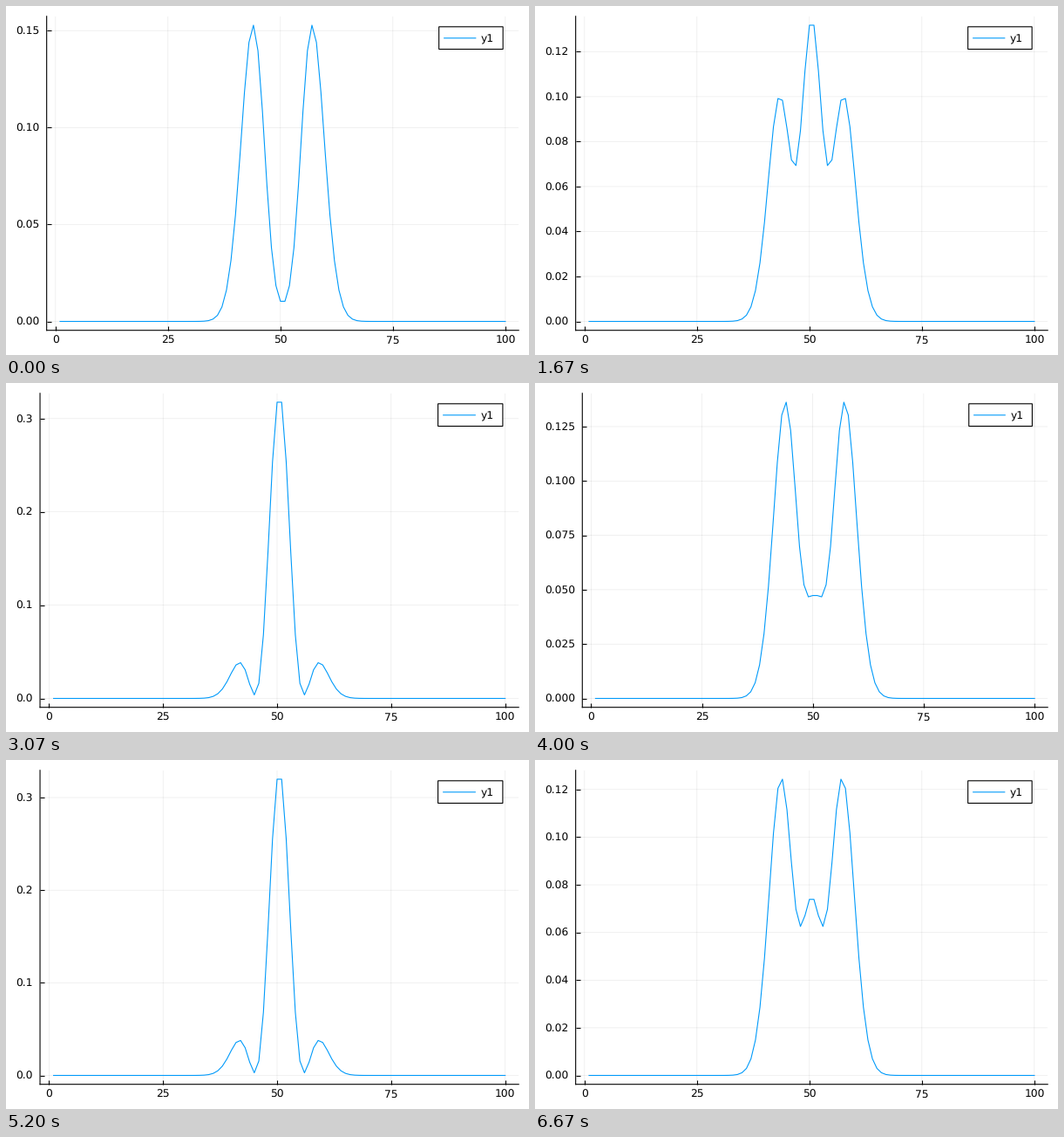
Animation of 600x400 px, one loop 6740 ms. Source, as a matplotlib script:

```python
import math

import numpy as np
import matplotlib.pyplot as plt
from matplotlib.animation import FuncAnimation
from matplotlib.lines import Line2D
from matplotlib.patches import Rectangle
from matplotlib.transforms import Affine2D

W, H, DPI = 600, 400, 100
FRAMES, INTERVAL = 101, 66.66  # 15 frames per second
TOP, RIGHT, BOTTOM = 11.8, 588.2, 371.7
BLUE = "#009AFA"
PHASE_STEP = 0.1978  # relative phase gained per frame
POINTS = 100


def pt(px):
    return px * 72 / DPI


FONT = pt(12.3)
THIN = pt(1.1)
plt.rcParams.update({
    "font.family": "DejaVu Sans",
    "text.hinting": "no_hinting",
    "path.snap": False,
})


def oscillator_states():
    """Ground and second excited state of a harmonic well on a grid."""
    x = np.linspace(-10, 10, POINTS)
    h = x[1] - x[0]
    hop = np.full(POINTS - 1, -0.5 / h**2)
    ham = np.diag(1 / h**2 + x**2 / 2) + np.diag(hop, 1) + np.diag(hop, -1)
    vecs = np.linalg.eigh(ham)[1]
    return [vecs[:, n] * np.sign(vecs[42, n]) for n in (0, 2)]


GROUND, EXCITED = oscillator_states()


def density(i):
    psi = GROUND + EXCITED * np.exp(-1j * PHASE_STEP * i)
    return np.abs(psi) ** 2


def nice_ticks(lo, hi):
    """Pick the best scored tick step; return ticks and decimals."""
    span = hi - lo
    best = None
    for base in (0.01, 0.1):
        for q, nice in ((1, 1), (5, 0.9), (2, 0.7), (2.5, 0.5), (3, 0.2)):
            step = q * base
            count = math.floor(hi / step + 1e-9) + 1
            if not 4 <= count <= 8:
                continue
            grain = 1 - abs(count - 5) / 5
            cover = 1.5 * span / ((count - 1) * step)
            score = grain / 4 + 1 / 6 + cover / 3 + nice / 4
            if best is None or score > best[0]:
                decimals = (1 if base == 0.1 else 2) + (q == 2.5)
                best = score, step * np.arange(count), decimals
    return best[1:]


fig = plt.figure(figsize=(W / DPI, H / DPI), dpi=DPI, facecolor="white")
ax = fig.add_axes([0.1, 0.1, 0.8, 0.8])
ax.set_axisbelow(True)
ax.grid(color="black", alpha=0.1, lw=0.4)
for side, spine in ax.spines.items():
    spine.set_visible(side in ("left", "bottom"))
    spine.set_linewidth(THIN)
ax.tick_params(direction="in", length=pt(4.6), width=THIN, labelsize=FONT)
ax.tick_params(axis="x", pad=pt(6.2))
ax.tick_params(axis="y", pad=pt(8.2))

pad = 0.03 * (POINTS - 1)
ax.set_xlim(1 - pad, POINTS + pad)
ax.set_xticks(range(0, 101, 25))
curve, = ax.plot(np.arange(1, POINTS + 1), density(0), color=BLUE, lw=THIN)

# Legend in pixel coordinates, origin at the top left
pixels = Affine2D().scale(1 / W, -1 / H).translate(0, 1) + fig.transFigure
box = Rectangle((497, 23.8), 73, 25.7, fc="white", ec="black", lw=THIN,
                transform=pixels, zorder=5)
sample = Line2D([503, 539], [36.8, 36.8], color=BLUE, lw=THIN,
                transform=pixels, zorder=6)
fig.add_artist(box)
fig.add_artist(sample)
name = fig.text(545, 41.3, "y1", fontsize=FONT, va="baseline",
                transform=pixels, zorder=6)


def place(left):
    """Fit the axes and the legend to the given left edge."""
    width = RIGHT - left
    ax.set_position([left / W, 1 - BOTTOM / H,
                     width / W, (BOTTOM - TOP) / H])
    box_right = RIGHT - width / 30
    box_width = 0.1078 * width + 15.1
    x = box_right - box_width
    gap, length = width / 90, width / 15
    box.set_x(x)
    box.set_width(box_width)
    sample.set_xdata([x + gap, x + gap + length])
    name.set_x(x + 2 * gap + length)


def draw(i):
    y = density(i)
    lo, hi = y.min(), y.max()
    margin = 0.03 * (hi - lo)
    lo, hi = lo - margin, hi + margin
    ticks, decimals = nice_ticks(lo, hi)
    curve.set_ydata(y)
    ax.set_yticks(ticks, [f"{t:.{decimals}f}" for t in ticks])
    ax.set_ylim(lo, hi)
    place(31.4 + 7.63 * decimals)
    return curve, box, sample, name


anim = FuncAnimation(fig, draw, frames=FRAMES, init_func=lambda: draw(0),
                     interval=INTERVAL, repeat=True, repeat_delay=0,
                     blit=False)
plt.show()
```
